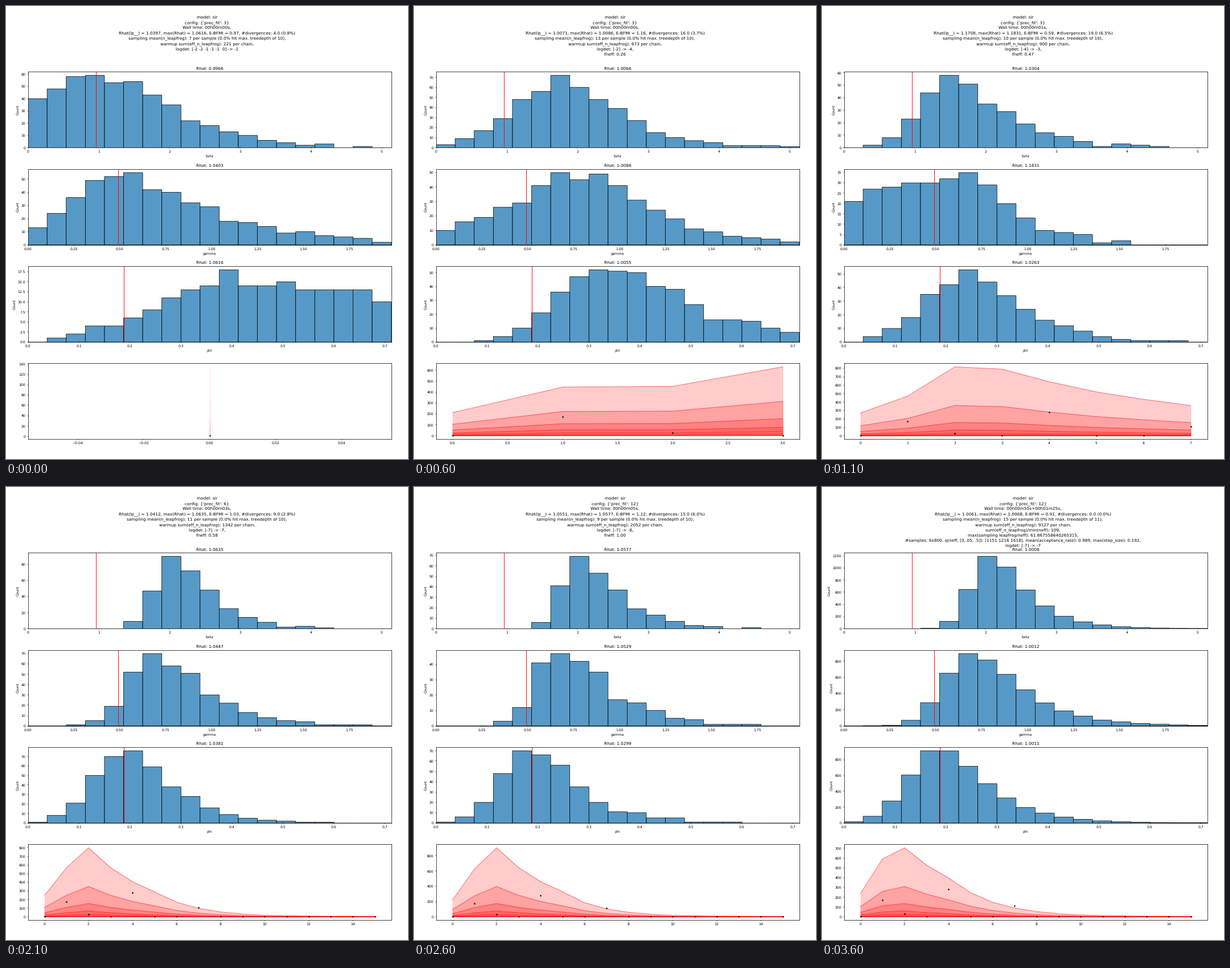
Animation, 706 px wide and 794 px high, one loop 4100 ms. Source, as a matplotlib script:

```python
import numpy as np
import matplotlib.pyplot as plt
from matplotlib.animation import FuncAnimation

W, H, DPI = 706, 794, 44.125
plt.rcParams.update({"font.family": "DejaVu Sans", "text.hinting": "none",
                     "axes.linewidth": 1.2})

BINS = 19
PARAMS = [("beta", 5.134, 0.957), ("gamma", 1.9777, 0.492), ("phi", 0.7129, 0.1885)]
CASES = {1: 173, 2: 31, 4: 283, 7: 112, 11: 5, 13: 3}  # every other day has 1
LEFT, WIDTH, TOP, HEIGHT, STEP = 38.6, 638, 115.3, 133, 170.35

# mode, left width and right width in bins, one row per parameter
PRIOR = np.array([(4, 5, 2.7), (4, 2.5, 4), (10, 4, 10)])
EARLY = np.array([(6, 2.4, 2.3), (7, 3.9, 3), (8, 2.2, 3.8)])
MIDDLE = np.array([(5, 1.5, 2.3), (5.5, 6.5, 2.2), (6, 2.2, 2.2)])
LATE = np.array([(7, 0.93, 1.65), (6, 1.3, 2.2), (4.5, 1.6, 2)])

# day: upper decile, joined by exponential curves
DAY_1 = {0: 135}
DAY_2 = {0: 175, 1: 500}
DAY_4 = {0: 213, 1: 446, 2: 453, 3: 631}
DAY_8 = {0: 272, 2: 817, 3: 790, 5: 520, 7: 360}
COARSE = {0: 280, 2: 695, 3: 712, 5: 244, 6: 233, 7: 91, 10: 17, 15: 4}
MEDIUM = {0: 250, 1: 570, 2: 800, 5: 290, 7: 100, 10: 19, 15: 4}
FINE = {0: 221, 1: 629, 2: 905, 5: 330, 7: 105, 10: 20, 15: 4}
FINAL = {0: 239, 1: 593, 2: 706, 4: 397, 5: 248, 10: 20, 15: 4}


def header(prec, wall, rhats, bfmi, div, mean, warm, rest, depth=10):
    return ["model: sir",
            f"config: {{'prec_fit': {prec}}}",
            f"Wall time: {wall},",
            f"Rhat(lp__) = {rhats[0]}, max(Rhat) = {rhats[1]}, "
            f"E-BFMI = {bfmi}, #divergences: {div}",
            f"sampling mean(n_leapfrog): {mean} per sample "
            f"(0.0% hit max. treedepth of {depth}),",
            f"warmup sum(eff_n_leapfrog): {warm} per chain,"] + rest


def warmup(logdet, fneff):
    return [f"logdet: {logdet},", f"fneff: {fneff}"]


def sampled(cost, worst, neff, accept, step, logdet):
    return [f"sum(eff_n_leapfrog)/min(neff): {cost},",
            f"max(sampling leapfrog/neff): {worst},",
            f"#samples: 6x800, q(neff, [0,.05, .5]): {neff}, "
            f"mean(acceptance_rate): {accept}, max(step_size): {step},",
            f"logdet: {logdet}"]


# header lines, Rhat per parameter, histogram shapes and peaks, forecast
STATES = [
    (header(3, "00h00m00s", ("1.0397", "1.0616"), "0.97", "4.0 (0.8%)", 7, 221,
            ["logdet: [-2 -2 -1 -1 -1  0] -> -1"]),
     ("0.9966", "1.0403", "1.0616"), PRIOR, (59, 55, 18), DAY_1),
    (header(3, "00h00m00s", ("1.0215", "1.0352"), "1.04", "9.0 (2.0%)", 10, 438,
            warmup("[-1] -> -2", "0.24")),
     ("1.0124", "1.0352", "1.0187"), (PRIOR + EARLY) / 2, (62, 50, 34), DAY_2),
    (header(3, "00h00m00s", ("1.0071", "1.0086"), "1.16", "16.0 (3.7%)", 13, 673,
            warmup("[-2] -> -4", "0.26")),
     ("1.0066", "1.0086", "1.0055"), EARLY, (72, 50, 52), DAY_4),
    (header(3, "00h00m01s", ("1.1708", "1.1831"), "0.59", "19.0 (6.5%)", 10, 900,
            warmup("[-4] -> -3", "0.47")),
     ("1.0304", "1.1831", "1.0263"), MIDDLE, (58, 35, 53), DAY_8),
    (header(3, "00h00m01s", ("1.0350", "1.0974"), "0.95", "5.0 (1.2%)", 13, 771,
            warmup("[-3] -> -7", "0.30")),
     ("1.0974", "1.0363", "1.0523"), LATE, (112, 93, 83), COARSE),
    (header(6, "00h00m03s", ("1.0412", "1.0635"), "1.03", "9.0 (2.8%)", 11, 1342,
            warmup("[-7] -> -7", "0.58")),
     ("1.0635", "1.0447", "1.0381"), LATE, (90, 70, 76), MEDIUM),
    (header(12, "00h00m05s", ("1.0551", "1.0577"), "1.12", "15.0 (6.0%)", 9, 2052,
            warmup("[-7] -> -8", "1.00")),
     ("1.0577", "1.0529", "1.0299"), LATE, (69, 47, 70), FINE),
    (header(12, "00h00m21s+00h00m46s", ("1.0083", "1.0094"), "0.93", "0.0 (0.0%)",
            15, 5218,
            sampled(118, "66.41830275229358", "[1084 1172 1543]", "0.985", "0.207",
                    "[-8] -> -7"), 11),
     ("1.0014", "1.0019", "1.0016"), LATE, (1180, 905, 900), FINAL),
    (header(12, "00h00m55s+00h01m25s", ("1.0061", "1.0068"), "0.91", "0.0 (0.0%)",
            15, 9127,
            sampled(109, "61.867558640265315", "[1151 1216 1618]", "0.989", "0.192",
                    "[-7] -> -7"), 11),
     ("1.0008", "1.0012", "1.0011"), LATE, (1190, 895, 912), FINAL),
]

rng = np.random.default_rng(4)
# the epsilon keeps the pixel height from truncating
fig = plt.figure(figsize=(W / DPI, (H + 1e-6) / DPI), dpi=DPI, facecolor="white")


def counts(shape, peak):
    """Skewed bell, Gaussian on the left and sech on the right, with noise."""
    mode, left, right = shape
    d = np.arange(BINS) - mode
    h = peak * np.where(d < 0, np.exp(-0.5 * (d / left) ** 2), 1 / np.cosh(d / right))
    h += 0.4 * np.sqrt(h) * rng.normal(size=BINS)
    return np.floor(np.maximum(h, 0) * peak / h.max() + 0.4)


def deciles(keys):
    """Nine curves, each a fixed share of the one above."""
    days = np.arange(max(keys) + 1)
    top = np.exp(np.interp(days, list(keys), np.log(list(keys.values()))))
    share = 0.5 if len(days) < 5 else 0.44
    return days, np.maximum(top * share ** np.arange(9)[:, None], 1)


def panel(row):
    y = H - TOP - row * STEP - HEIGHT
    return fig.add_axes([LEFT / W, y / H, WIDTH / W, HEIGHT / H])


def draw_hist(ax, h, rhat, name, xmax, truth):
    w = xmax / BINS
    ax.bar(np.arange(BINS) * w, h, w, align="edge", snap=False,
           facecolor=(0.122, 0.467, 0.706, 0.75), edgecolor="black", linewidth=1.2)
    ax.axvline(truth, color="red", lw=1.5)
    ax.set(xlim=(0, xmax), ylim=(0, h.max() * 1.05),
           xlabel=name, ylabel="Count", title=f"Rhat: {rhat}")


def draw_forecast(ax, keys):
    days, q = deciles(keys)
    for i in range(4):
        ax.fill_between(days, q[8 - i], q[i], color="red", alpha=0.2)
    for curve in q:
        ax.plot(days, curve, color="red", alpha=0.55, lw=1.5)
    ax.plot(days, [CASES.get(d, 1) for d in days], "k.", snap=False)


def build(lines, rhats, shapes, peaks, keys):
    group = [fig.text(0.5, 1 - (21.6 + 9.27 * i) / H, s, ha="center",
                      va="baseline", fontsize=12) for i, s in enumerate(lines)]
    axes = [panel(row) for row in range(4)]
    for ax, param, rhat, shape, peak in zip(axes, PARAMS, rhats, shapes, peaks):
        draw_hist(ax, counts(shape, peak), rhat, *param)
    draw_forecast(axes[3], keys)
    return group + axes


groups = [build(*state) for state in STATES]


def update(frame):
    now = (frame + 4) // 5  # first state lasts 100 ms, the rest 500 ms
    for i, group in enumerate(groups):
        for artist in group:
            artist.set_visible(i == now)
    return []


update(0)
anim = FuncAnimation(fig, update, frames=41, interval=100, repeat=True,
                     repeat_delay=0, blit=False)
plt.show()
```
